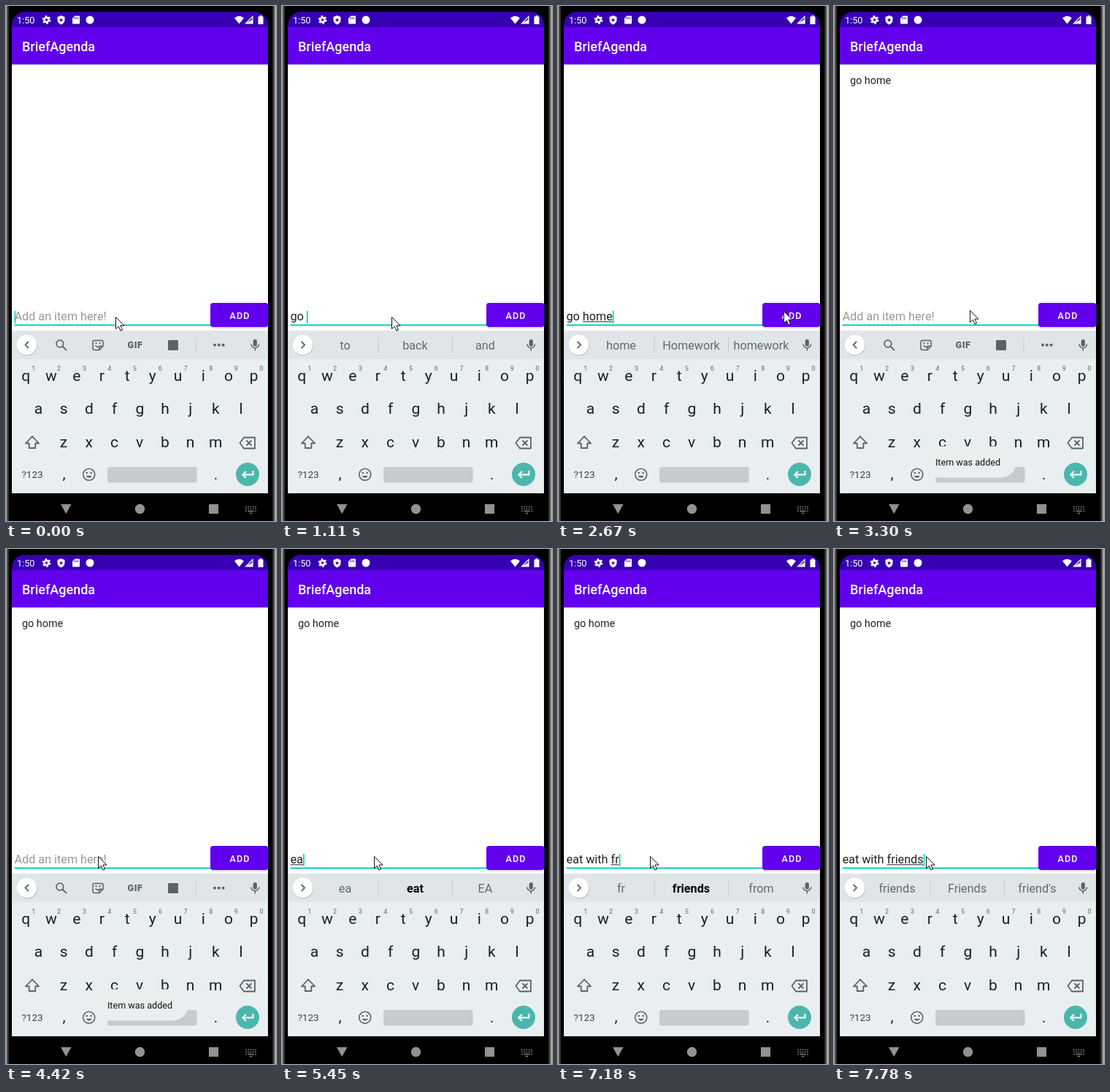
Write an HTML page that moves like this. It is 370x706 px and loops after 8000 ms.

```html
<!DOCTYPE html>
<html lang="en">
<head>
<meta charset="utf-8">
<title>To-do list</title>
<style>
html, body { margin: 0; width: 100%; height: 100%; overflow: hidden; background: #000; }
svg { display: block; width: 100%; height: 100%; }
text { font-family: Roboto, sans-serif; white-space: pre; }
.mid { text-anchor: middle; }
.field { font-size: 16.2px; fill: #212121; }
.word { font-size: 16.2px; fill: #5f6b70; text-anchor: middle; }
.key { font-size: 21px; fill: #10232b; text-anchor: middle; }
.digit { font-size: 9px; font-weight: 500; fill: #7b868b; text-anchor: middle; }
.icon { fill: #586469; }
.line { fill: none; stroke: #586469; stroke-width: 1.8; }
</style>
</head>
<body>
<svg viewBox="0 0 370 706">
  <defs>
    <clipPath id="screen"><path d="M8 706V26a18 18 0 0 1 18-18H341a18 18 0 0 1 18 18V706z"/></clipPath>
    <linearGradient id="drop" x2="0" y2="1">
      <stop stop-color="#000" stop-opacity=".2"/><stop offset="1" stop-color="#000" stop-opacity="0"/>
    </linearGradient>
  </defs>

  <!-- phone body -->
  <rect width="370" height="706"/>
  <path d="M0 0H1.5V706H0zM368 0h2V706h-2z" fill="#a5a3a2"/>
  <path d="M1.5 0H3.5V706H1.5zM365.500 0H368V706h-2.500z" fill="#4b4948"/>

  <g clip-path="url(#screen)">
    <rect x="8" y="8" width="351" height="21.500" fill="#3700b3"/>
    <rect x="8" y="80" width="351" height="366" fill="#fff"/>
    <rect x="8" y="29" width="351" height="51" fill="#6200ee"/>
    <rect x="8" y="80" width="351" height="2.500" fill="url(#drop)"/>
    <rect x="8" y="445" width="351" height="223" fill="#e9eef1"/>
    <rect x="8" y="445" width="351" height="39" fill="#e0e5e8"/>
  </g>

  <!-- status bar -->
  <g fill="#fff">
    <text x="15" y="23.500" font-size="12.600">1:50</text>
    <circle cx="55.500" cy="19" r="3.100" fill="none" stroke="#fff" stroke-width="2.600"/>
    <circle cx="55.500" cy="19" r="5" fill="none" stroke="#fff" stroke-width="1.800" stroke-dasharray="2.600 2.636"/>
    <path d="M75.500 13l5 2v4q0 4-5 6.500q-5-2.500-5-6.500v-4z"/>
    <path d="M75.500 16.500l.8 1.700 1.900.2-1.400 1.300.4 1.900-1.700-1-1.700 1 .4-1.900-1.400-1.300 1.900-.2z" fill="#3700b3"/>
    <path d="M94.500 13.500h5.500q1 0 1 1v9q0 1-1 1h-8q-1 0-1-1v-6.500z"/>
    <path d="M94 15.500v2.500M96.300 15.500v2.500M98.600 15.500v2.500" stroke="#3700b3"/>
    <circle cx="115" cy="19" r="5.500"/>
    <path d="M319.500 24.500l-6.500-8q6.500-5.500 13 0z"/>
    <path d="M338 14.500v9.500h-9.500z" fill="none" stroke="#fff" stroke-width="1.200"/>
    <path d="M338 18.500v5.500h-9.500z"/>
    <path d="M345.500 14.500h2v-1.500h3v1.500h2v10.500h-7z"/>
  </g>
  <text x="22" y="62" font-size="18" font-weight="500" fill="#fff">BriefAgenda</text>

  <!-- list and entry row -->
  <text id="item" x="22" y="107" font-size="14.400" fill="#212121">go home</text>
  <rect x="11.500" y="436.500" width="270" height="2" fill="#03cdb9"/>
  <rect x="281" y="409" width="78" height="33" rx="4" opacity=".14"/>
  <rect id="button" x="280" y="407" width="79.500" height="33" rx="4"/>
  <text x="320.600" y="428.500" class="mid" font-size="12.600" font-weight="500" letter-spacing="1.120" fill="#fff">ADD</text>
  <text id="hint" x="11.500" y="431" class="field" style="fill:#999">Add an item here!</text>
  <text id="entry" x="11.500" y="431" class="field"></text>
  <rect id="under" y="432.300" height="1" fill="#212121"/>
  <rect id="caret" y="418" width="1.800" height="17" fill="#03dac5"/>

  <!-- strip above the keys -->
  <circle cx="29" cy="465.600" r="14" opacity=".14"/>
  <circle cx="28.500" cy="464.500" r="13.700" fill="#fff"/>
  <path id="chevron" class="line"/>
  <g id="tools">
    <circle cx="73.800" cy="463" r="4.800" class="line"/>
    <path d="M77.300 466.500l5.700 5.700" class="line" stroke-width="2.200"/>
    <path d="M121 458.500h10q2 0 2 2v6l-5 5h-7q-2 0-2-2v-9q0-2 2-2zM133 466.500h-3q-2 0-2 2v3" class="line" style="stroke-width:1.500"/>
    <path d="M122.500 465.500q3.500 4 7 0" class="line" style="stroke-width:1.400"/>
    <path d="M122.500 461.200h2v2h-2zM127.500 461.200h2v2h-2z" class="icon"/>
    <text x="177" y="469" class="mid icon" font-size="12.500" font-weight="900" letter-spacing=".6">GIF</text>
    <rect x="222" y="458" width="14" height="14" rx="1.500" class="icon"/>
    <path d="M260 455v20" stroke="#c6cccf"/>
    <g class="icon"><circle cx="286" cy="464.700" r="2"/><circle cx="291.800" cy="464.700" r="2"/><circle cx="297.600" cy="464.700" r="2"/></g>
  </g>
  <g id="words">
    <path d="M132 454v21M233.500 454v21" stroke="#c3c9cc"/>
    <text class="word" x="86.500" y="471"></text>
    <text class="word" x="182.500" y="471"></text>
    <text class="word" x="278.500" y="471"></text>
  </g>
  <rect x="338.700" y="457" width="5.200" height="9.500" rx="2.600" class="icon"/>
  <path d="M336 463.500a5.300 5.300 0 0 0 10.600 0M341.300 469v3.500" class="line" style="stroke-width:1.500"/>

  <!-- keys -->
  <g id="keys"></g>
  <path d="M36 590l-9 9.500h4.700v6.500h8.600v-6.500h4.700z" class="line" stroke-linejoin="round"/>
  <path d="M326 591.500h15v15h-15l-5.500-7.500zM329.500 595.500l7 7M336.500 595.500l-7 7" class="line" stroke-linejoin="round"/>
  <text x="36" y="647" class="mid" font-size="13.500" fill="#33434a">?123</text>
  <text x="79.500" y="648" class="key">,</text>
  <circle cx="113.700" cy="642.300" r="8" class="line" style="stroke-width:1.600"/>
  <path d="M109.500 644q4.200 5.500 8.400 0z" class="icon"/>
  <g class="icon"><circle cx="110.800" cy="640" r="1.300"/><circle cx="116.600" cy="640" r="1.300"/></g>
  <rect x="139" y="632" width="122.500" height="21.500" rx="3" fill="#c6cbce"/>
  <text x="287.500" y="649" class="key">.</text>
  <circle cx="331" cy="642" r="16" fill="#4db6ac"/>
  <path d="M338.500 637v5.500h-14M329 638l-4.800 4.500 4.800 4.500" fill="none" stroke="#fff" stroke-width="1.900"/>

  <!-- navigation bar -->
  <g fill="#929292">
    <path d="M75 683h14.500l-7.250 13z"/>
    <circle cx="183.500" cy="689.500" r="6.700"/>
    <rect x="278" y="683" width="13" height="13"/>
    <path d="M328 686.500h15M328 689.500h15M328 692.500h2" fill="none" stroke="#858585" stroke-width="1.600" stroke-dasharray="1.700 1.600"/>
    <path d="M331.500 692.500h8M341.300 692.500h1.700M334 695.500h3" stroke="#858585" stroke-width="1.500"/>
  </g>

  <g id="toast">
    <rect x="118" y="603.500" width="132" height="43" rx="21.500" fill="#ebeeef"/>
    <text x="183.500" y="630" class="mid" font-size="12.600" fill="#151515">Item was added</text>
  </g>
  <path id="mouse" d="M0 0V16.200L3.800 12.700L6.400 18.600L9 17.500L6.500 11.600H11.500z" fill="#fff" stroke="#111" stroke-width="1"/>
</svg>

<script>
const $ = id => document.getElementById(id);

function addKeys(row, x0, y, digits) {
  [...row].forEach((c, i) => {
    const x = x0 + i * 34.7;
    let s = `<text class="key" x="${x}" y="${y}">${c}</text>`;
    if (digits) s += `<text class="digit" x="${x + 10.500}" y="500">${(i + 1) % 10}</text>`;
    $('keys').innerHTML += s;
  });
}
addKeys('qwertyuiop', 27.3, 514, true);
addKeys('asdfghjkl', 44.5, 559);
addKeys('zxcvbnm', 79, 604.5);

// [time, entry text, suggestions]; a * marks the bold one
const typing = [
  [0, ''],
  [680, 'go', 'go *good going'],
  [1110, 'go ', 'to back and'],
  [1390, 'go h', 'h *home here'],
  [1510, 'go ho', 'ho *home how'],
  [1640, 'go hom', 'hom *home Homework'],
  [1760, 'go home', 'home Homework homework'],
  [3060, ''],
  [5300, 'e', 'e *eat I'],
  [5450, 'ea', 'ea *eat EA'],
  [5730, 'eat', 'eat eating eats'],
  [5850, 'eat ', 'the at and'],
  [6130, 'eat w', 'w *with what'],
  [6260, 'eat wi', 'wi *with will'],
  [6390, 'eat with', 'with without width'],
  [6520, 'eat with ', 'you us me'],
  [6910, 'eat with f', 'f *friends family'],
  [7050, 'eat with fr', 'fr *friends from'],
  [7200, 'eat with fri', 'fri *friends friend'],
  [7340, 'eat with frie', 'frie *friends friend'],
  [7490, 'eat with frien', 'frien *friends friend'],
  [7630, 'eat with friend', 'friend friends Friend'],
  [7780, 'eat with friends', "friends Friends friend's"]
];
const pointer = [
  [0, 150.5, 426.5], [2340, 196, 424], [2500, 268, 420], [2670, 309.5, 418.5],
  [3300, 186.5, 417.5], [3440, 168, 418], [3560, 145, 419], [3680, 128, 420],
  [3800, 124, 421], [4170, 126.5, 421.5]
];
const caretOn = [
  [0, 1], [120, 0], [680, 1], [2220, 0], [2670, 1], [3060, 0],
  [3800, 1], [4300, 0], [4740, 1], [5140, 0], [5300, 1]
];
const toastAlpha = [[0, 0], [3180, .5], [3300, 1], [4880, .5], [5000, 0]];
const at = (steps, t) => steps.findLast(s => s[0] <= t);
const show = (id, on) => $(id).setAttribute('visibility', on ? 'visible' : 'hidden');

function draw(t) {
  const [, text, list] = at(typing, t);
  const entry = $('entry');
  entry.textContent = text;
  const width = n => n ? entry.getSubStringLength(0, n) : 0;
  const start = text.lastIndexOf(' ') + 1;
  const left = 11.5 + width(start), end = 11.5 + width(text.length);
  $('under').setAttribute('x', left);
  $('under').setAttribute('width', Math.max(0, end - left));
  $('caret').setAttribute('x', end);
  show('caret', at(caretOn, t)[1]);

  show('hint', !text);
  show('tools', !text);
  show('words', text);
  $('chevron').setAttribute('d', text ? 'M26.500 460l4.500 4.600-4.500 4.600' : 'M31 460l-4.500 4.600 4.500 4.600');
  const words = (list || '').split(' ');
  document.querySelectorAll('.word').forEach((el, i) => {
    const word = words[i] || '', bold = word[0] === '*';
    el.textContent = bold ? word.slice(1) : word;
    el.style.fontWeight = bold ? 700 : 400;
    el.style.fill = bold ? '#000' : '';
  });

  show('item', t >= 3060);
  $('button').setAttribute('fill', t >= 2820 && t < 3180 ? '#7b2ff2' : '#6200ee');
  $('toast').setAttribute('opacity', at(toastAlpha, t)[1]);
  const [, x, y] = at(pointer, t);
  $('mouse').setAttribute('transform', `translate(${x} ${y})`);
}

const begin = performance.now();
function frame() {
  draw((performance.now() - begin) % 8000);
  requestAnimationFrame(frame);
}
frame();
</script>
</body>
</html>
```
